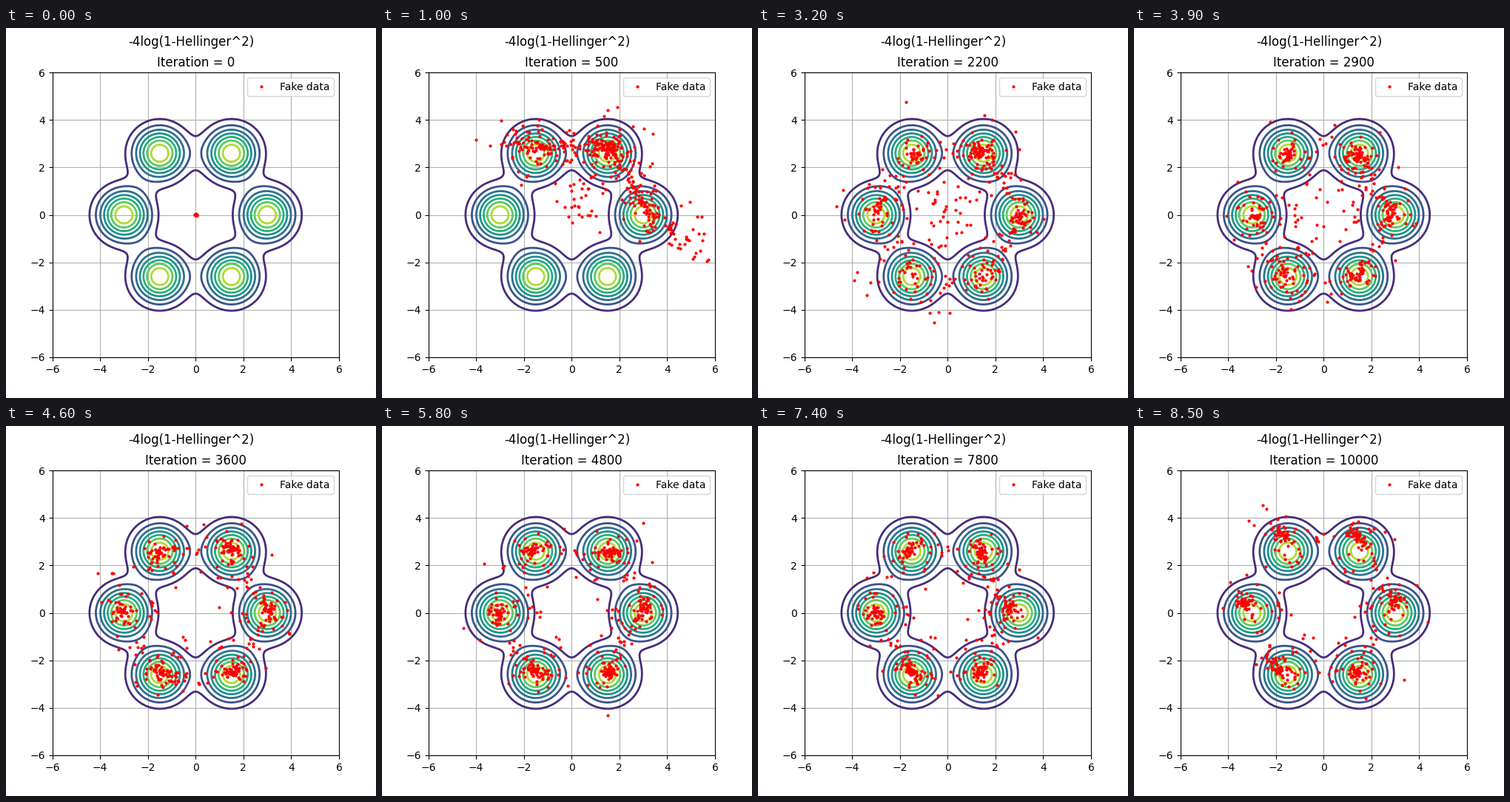
A matplotlib script for the animation above (8.6 s loop, 500 by 500 pixels).

```python
import numpy as np
import matplotlib.pyplot as plt
from matplotlib.animation import FuncAnimation

FRAMES = 86
COUNT = 460
INNER = 36

# Six modes on a circle of radius 3, counter-clockwise from the right
turn = np.arange(6) * np.pi / 3
MODES = 3 * np.column_stack([np.cos(turn), np.sin(turn)])

rng = np.random.default_rng(5)
latent = rng.uniform(-1, 1, COUNT)
noise = rng.normal(size=(2, COUNT, 2))
spread = np.minimum(np.exp(.75 * rng.normal(size=COUNT)), 2.8)
pull = np.zeros(COUNT)
pull[:INNER] = rng.uniform(.45, 1, INNER)
hub = rng.normal([.15, -.05], [.4, .7], (COUNT, 2))
phase = rng.uniform(0, 2 * np.pi, (6, 3))


def smooth(x):
    x = np.clip(x, 0, 1)
    return x * x * (3 - 2 * x)


def polar(angle):
    return np.column_stack([np.cos(angle), np.sin(angle)])


def iteration(i):
    if i <= 20:
        return 50 * i
    if i <= 60:
        return 1000 + 100 * (i - 20)
    return 5000 + 200 * (i - 60)


def mode_poses(i, lift):
    """Centre and streak angle of every cluster."""
    shift = .13 * np.sin(.4 * i + phase[:, :2])
    squeeze = np.exp(-((i - 74) / 5) ** 2)
    shift[:, 0] -= .4 * squeeze * np.maximum(np.cos(turn), 0)
    shift[:, 0] += lift * (.25 * np.cos(turn) - .15)
    shift[:, 1] += lift * (.35 * np.sin(turn) + .5)
    angle = turn + np.pi / 2 + .6 * np.sin(.2 * i + phase[:, 2])
    return MODES + shift, angle + lift * (2.4 - angle)


def points(i):
    t = max(i, 20)
    opening = smooth((t - 20) / 12)
    lift = smooth((t - 74) / 11)
    centers, angle = mode_poses(t, lift)

    # Place along the ring, gathered around the nearest mode
    even = smooth((t - 32) / 14)
    c = 1 + (1.35 + 1.65 * opening) * np.sign(latent) * \
        np.abs(latent) ** (1.25 - .25 * even)
    near = np.round(c).astype(int)
    d = c - near
    power = np.interp(t, [20, 32, 46, 85], [1.9, 3.5, 6, 8])
    step = .5 * np.abs(2 * d) ** power
    m = near % 6
    side = (near + np.sign(d).astype(int)) % 6
    pos = centers[m] + (centers[side] - centers[m]) * step[:, None]

    # Streak around the mode; newly reached modes start out wide
    e = noise[0] * np.cos(.025 * t) + noise[1] * np.sin(.025 * t)
    fresh = np.clip(np.abs(c - 1) - 1, 0, 1.5) * np.exp(-max(t - 32, 0) / 8)
    size = spread * (1 + .7 * fresh)
    along = polar(angle[m])
    across = polar(angle[m] + np.pi / 2)
    thick = .25 - .08 * even
    pos += (size * e[:, 0])[:, None] * .3 * along
    pos += (size * e[:, 1])[:, None] * thick * across

    # Loose ends while the ring is still open
    pos += (1 - opening) * np.maximum(-c, 0)[:, None] * [6, -2]
    pos += (1 - opening) * np.maximum(c - 2, 0)[:, None] * [-2.5, 2]

    p = (pull * (1 - .45 * even))[:, None]
    pos = pos * (1 - p) + hub * p
    grow = np.interp(i, [0, 3, 8, 14, 20], [.008, .35, 1.18, 1.08, 1])
    return pos * grow


fig, ax = plt.subplots(figsize=(5, 5), dpi=100)
fig.suptitle("-4log(1-Hellinger^2)")
title = ax.set_title("Iteration = 0")

axis = np.linspace(-6, 6, 240)
X, Y = np.meshgrid(axis, axis)
density = sum(np.exp(-(X - a) ** 2 - (Y - b) ** 2) / np.pi for a, b in MODES)
ax.contour(X, Y, density, levels=np.arange(1, 8) * .04, cmap="viridis",
           vmin=0, vmax=.32, linewidths=2)
dots, = ax.plot([], [], "r.", ms=4, zorder=3, label="Fake data")
ax.set(xlim=(-6, 6), ylim=(-6, 6))
ax.set_xticks(range(-6, 7, 2))
ax.set_yticks(range(-6, 7, 2))
ax.grid(True)
ax.legend(loc="upper right")


def update(i):
    dots.set_data(*points(i).T)
    title.set_text(f"Iteration = {iteration(i)}")
    return dots, title


anim = FuncAnimation(fig, update, frames=FRAMES, interval=100, repeat=True)
plt.show()
```
